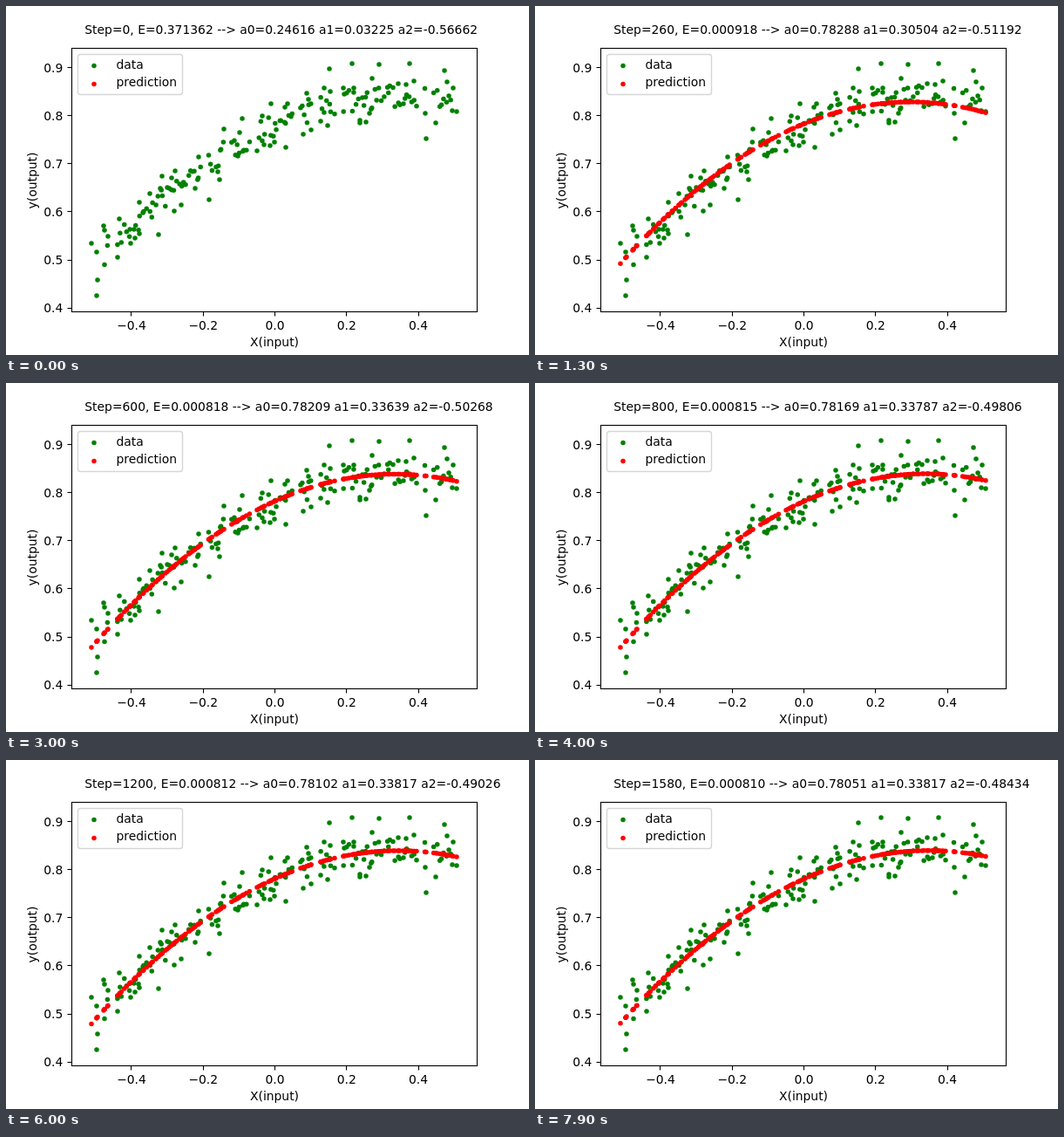
These frames come from a looping animation (600x400 px, 8000 ms). An HTML page:

```html
<!DOCTYPE html>
<html>
<head>
<meta charset="utf-8">
<style>
html, body { margin: 0; width: 100%; height: 100%; overflow: hidden; background: #fff; }
svg { display: block; }
text { font: 13.89px "DejaVu Sans", sans-serif; white-space: pre; }
</style>
</head>
<body>
<svg id="plot" width="600" height="400" viewBox="0 0 600 400">
  <clipPath id="area"><rect x="75" y="48" width="466" height="303"/></clipPath>
  <g id="dots" clip-path="url(#area)"></g>
  <g id="axes"><rect x="75.5" y="48.5" width="465" height="302" fill="none" stroke="#000" stroke-width="1.1"/></g>
  <rect x="82.5" y="55.5" width="120" height="46" rx="3" fill="#fff" fill-opacity=".8" stroke="#ccc" stroke-opacity=".8" stroke-width="1.4"/>
  <circle cx="101" cy="68.6" r="2.75" fill="green"/>
  <circle cx="101" cy="89.5" r="2.75" fill="red"/>
  <text x="126.5" y="72">data</text>
  <text x="126.5" y="92">prediction</text>
  <text x="308" y="390" text-anchor="middle">X(input)</text>
  <text transform="translate(35 200) rotate(-90)" text-anchor="middle">y(output)</text>
  <text id="title" x="90.3" y="32"></text>
</svg>
<script>
const $ = id => document.getElementById(id);

function add(parent, tag, attrs, text = '') {
  const el = document.createElementNS('http://www.w3.org/2000/svg', tag);
  for (const key in attrs) el.setAttribute(key, attrs[key]);
  el.textContent = text;
  return parent.appendChild(el);
}

const toX = px => (px - 308.5) / 411.3;
const toPx = x => 308.5 + 411.3 * x;
const toPy = y => 125.6 + (0.8 - y) * 551.7;

// Axis ticks and labels
for (let i = -2; i <= 2; i++) {
  const v = i / 5, x = Math.floor(toPx(v)) + 0.5;
  add($('axes'), 'path', { d: `M${x} 351v4.5`, stroke: '#000', 'stroke-width': 1.1 });
  add($('axes'), 'text', { x: toPx(v), y: 371, 'text-anchor': 'middle' }, v.toFixed(1).replace('-', '\u2212'));
}
for (let i = 4; i <= 9; i++) {
  const v = i / 10, y = Math.floor(toPy(v)) + 0.5;
  add($('axes'), 'path', { d: `M75 ${y}h-4.5`, stroke: '#000', 'stroke-width': 1.1 });
  add($('axes'), 'text', { x: 65.3, y: toPy(v) + 5.2, 'text-anchor': 'end' }, v.toFixed(1));
}

// Scattered outliers in pixels; the rest of the cloud is seeded noise around the fit
const outliers = [
  98,272, 104,282, 104,332, 105,314, 112,252, 113,257, 117,264, 128,288, 130,244, 143,272,
  148,266, 153,225, 153,261, 165,215, 175,262, 177,209, 179,195, 190,197, 193,235, 194,189,
  201,228, 217,209, 221,173, 233,222, 243,190, 245,199, 250,141, 266,172, 271,129, 268,145,
  288,166, 296,159, 303,160, 308,156, 294,126, 304,112, 320,116, 323,112, 321,162, 341,147,
  350,142, 345,100, 347,107, 365,94, 369,137, 371,72, 372,98, 361,132, 387,94, 397,66,
  399,94, 406,131, 413,133, 406,134, 417,123, 420,83, 428,67, 450,89, 459,90, 463,66,
  468,86, 481,123, 482,152, 493,134, 503,74, 506,87, 513,94, 512,120, 517,121
];
const gaps = [120, 225, 251, 281, 329, 352, 379, 473, 483];

let seed = 7;
function random() {
  seed = (seed * 16807) % 2147483647;
  return seed / 2147483647;
}

const points = [];
for (let i = 0; i < outliers.length; i += 2) points.push([outliers[i], outliers[i + 1]]);
for (let i = 0; i < 152; i++) {
  const px = 113 + 398 * (i + random()) / 152;
  const noise = 26 * (random() - 0.5);
  if (gaps.some(g => px > g && px < g + 7)) continue;
  const x = toX(px);
  points.push([px, toPy(0.78 + 0.338 * x - 0.484 * x * x) + noise]);
}

const dot = (px, py, fill) => add($('dots'), 'circle', { cx: px, cy: py, r: 2.75, fill });
points.forEach(([px, py]) => dot(px, py, 'green'));
const fitted = points.map(([px]) => ({ x: toX(px), el: dot(px, 500, 'red') }));

// Gradient descent in closed form: three decaying modes per coefficient
function model(step) {
  const slow = Math.exp(-0.000572 * step);
  const mid = Math.exp(-0.008545 * step);
  const fast = Math.exp(-0.1061 * step);
  return {
    a0: 0.77841 + 0.00518 * slow + 0.00003 * mid - 0.53746 * fast,
    a1: 0.338132 + 0.0001 * slow - 0.306023 * mid + 0.000041 * fast,
    a2: -0.45994 - 0.06024 * slow - 0.00055 * mid - 0.04589 * fast,
    error: 0.0008069 + 0.0000207 * slow ** 2 + 0.008113 * mid ** 2 + 0.3624214 * fast ** 2
  };
}

let shown = -1;
function draw() {
  const step = Math.floor(performance.now() % 8000 / 100) * 20;
  if (step !== shown) {
    shown = step;
    const { a0, a1, a2, error } = model(step);
    $('title').textContent = `Step=${step}, E=${error.toFixed(6)} --> ` +
      `a0=${a0.toFixed(5)} a1=${a1.toFixed(5)} a2=${a2.toFixed(5)}`;
    for (const { x, el } of fitted) el.setAttribute('cy', toPy(a0 + a1 * x + a2 * x * x));
  }
  requestAnimationFrame(draw);
}
draw();
</script>
</body>
</html>
```
